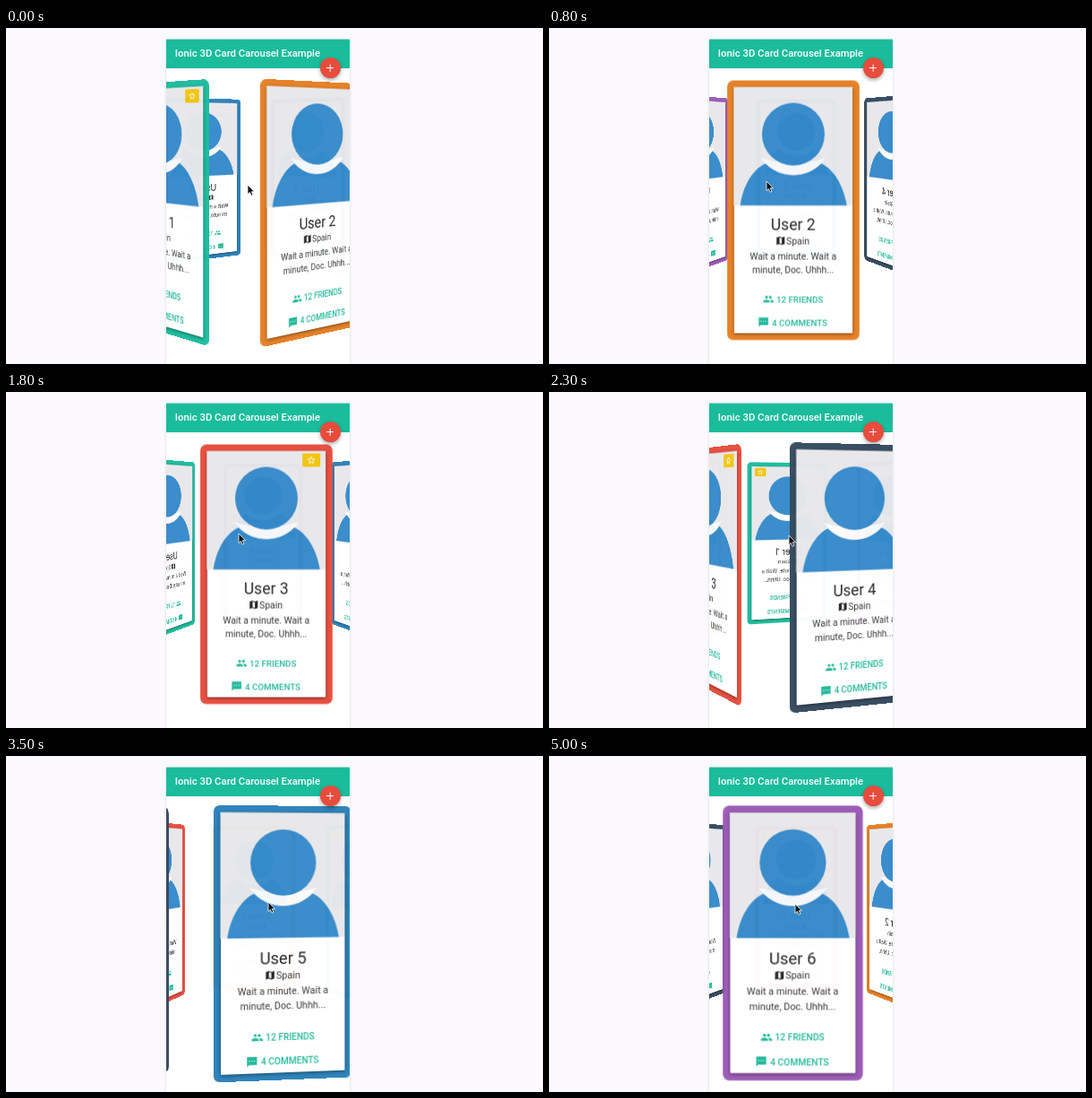
An HTML page that plays this animation: 600x375 px, repeating every 5.1 s.

```html
<!DOCTYPE html>
<html lang="en">
<head>
<meta charset="utf-8">
<title>3D card carousel</title>
<style>
  html, body { margin: 0; width: 100%; height: 100%; overflow: hidden; background: #fbf9fd; }
  body { position: relative; font-family: Roboto, sans-serif; }
  #phone {
    position: absolute; left: 179px; top: 13px; width: 205px; height: 362px;
    background: #fff; box-shadow: 0 0 3px rgba(0, 0, 0, .14);
  }
  #scene {
    position: absolute; inset: 0; overflow: hidden;
    perspective: 560px; perspective-origin: 103px 98.5px;
  }
  .card {
    position: absolute; left: 27.25px; top: 43.7px; width: 151.5px; height: 297.5px;
    border-radius: 7px; opacity: .97;
  }
  .sheet {
    position: absolute; inset: 7.5px; background: #fff; border-radius: 1px;
    box-shadow: 0 1px 4px rgba(0, 0, 0, .5);
  }
  .card svg { position: absolute; left: 0; top: 0; }
  header {
    position: absolute; left: 0; top: 0; width: 100%; height: 32px;
    background: #1abc9c; box-shadow: 0 -1px rgba(26, 188, 156, .4);
    color: #fff; font-size: 11.35px; font-weight: 500; line-height: 31px;
    text-indent: 9.8px; white-space: nowrap; z-index: 2;
  }
  #add {
    position: absolute; left: 171.8px; top: 20px; width: 23px; height: 23px; z-index: 3;
    border-radius: 50%; background: #e74c3c; box-shadow: 0 2px 4px rgba(0, 0, 0, .35);
  }
  #add::before, #add::after {
    content: ""; position: absolute; left: 7.5px; top: 10.8px;
    width: 8px; height: 1.4px; background: #fff;
  }
  #add::after { transform: rotate(90deg); }
  #cursor { position: absolute; left: 0; top: 0; z-index: 4; }
</style>
</head>
<body>
<div id="phone">
  <div id="scene"></div>
  <header>Ionic 3D Card Carousel Example</header>
  <div id="add"></div>
</div>
<svg id="cursor" width="12" height="16" viewBox="-1 -1 12 16">
  <path d="M0 0V10.5L2.4 8.4 4 12.2 5.9 11.4 4.3 7.7H7.5Z" fill="#111" stroke="#fff" stroke-width=".8"/>
</svg>
<script>
const LOOP = 5100, FRAME = 100, TURN = 1000;
const RADIUS = 189.5, WOBBLE = 18.5;
const COLORS = ['#1abc9c', '#e67e22', '#e74c3c', '#34495e', '#2980b9', '#9b59b6'];
const STARRED = [1, 3];
const TURN_STARTS = [-320, 800, 1820, 2850, 3915];

// time, x, y
const POINTER = [
  [0, 270, 175], [350, 296, 172], [650, 292, 172], [800, 243, 171], [950, 220, 166],
  [1500, 283, 159], [1700, 284, 158], [1800, 260, 158], [1950, 222, 159],
  [2500, 294, 160], [2700, 298, 160], [2800, 280, 160], [2950, 228, 161],
  [3500, 293, 163], [3750, 297, 163], [3900, 270, 163], [4200, 235, 163],
  [5000, 275, 165], [5100, 277, 166]
];

const ICONS = {
  map: '<path fill-rule="evenodd" d="M3 5L9 3l6 2 6-2v16l-6 2-6-2-6 2zM9.5 5v12l5 2V7z"/>',
  people: '<circle cx="8" cy="8" r="3"/><circle cx="16" cy="8" r="3"/>' +
    '<path d="M1 19v-2.5C1 14 5.5 13 8 13s7 1 7 3.5V19zM17 19v-2.5c0-1.5-.7-2.5-1.5-3.4C18 13 23 14 23 16.5V19z"/>',
  chat: '<path fill-rule="evenodd" d="M2 2h20v16H6l-4 4zM6 9v2h2V9zM11 9v2h2V9zM16 9v2h2V9z"/>'
};

const icon = (name, x, y, size, color) =>
  `<g transform="translate(${x} ${y}) scale(${size / 24})" fill="${color}">${ICONS[name]}</g>`;

const label = (text, x, y, size, color = '#333', anchor = 'start', weight = 400) =>
  `<text x="${x}" y="${y}" font-size="${size}" fill="${color}" text-anchor="${anchor}" font-weight="${weight}">${text}</text>`;

function starBadge() {
  const points = Array.from({ length: 10 }, (_, i) => {
    const a = i * Math.PI / 5 - Math.PI / 2, r = i % 2 ? 1.9 : 4.2;
    return [127.6 + r * Math.cos(a), 18.2 + r * Math.sin(a)].map(v => v.toFixed(2));
  });
  return `<rect x="117.3" y="10.3" width="20.6" height="15.4" rx="1.5" fill="#f1c40f"/>
    <polygon points="${points.join(' ')}" fill="none" stroke="#fff" stroke-width=".9"/>`;
}

function cardArt(n) {
  const mid = 75.75, teal = '#1fb899', blue = '#3489ca';
  return `<svg width="151.5" height="297.5" font-family="Roboto, sans-serif">
    <rect x="7.5" y="7.5" width="136.5" height="136" fill="#e8e8eb"/>
    <path d="M15 143.5C18 122 29 102 44 95.5A45 45 0 0 0 108 95.5C123 102 134 122 137.5 143.5Z" fill="${blue}"/>
    <path d="M39 89A45 45 0 0 0 113 89Q98 94 76 94T39 89Z" fill="#fafafa"/>
    <circle cx="76" cy="61.7" r="36" fill="${blue}"/>
    ${STARRED.includes(n) ? starBadge() : ''}
    ${label('User ' + n, mid, 172, 18, '#222', 'middle')}
    ${icon('map', 55.2, 177.8, 12.4, '#222')}
    ${label('Spain', 67.9, 187.8, 10.7)}
    ${label('Wait a minute. Wait a', mid, 205.3, 10.6, '#333', 'middle')}
    ${label('minute, Doc. Uhhh...', mid, 221.3, 10.6, '#333', 'middle')}
    ${icon('people', 40.8, 244.5, 13.2, teal)}
    ${label('12 FRIENDS', 56.6, 254.7, 10, teal, 'start', 500)}
    ${icon('chat', 35.2, 271, 13, teal)}
    ${label('4 COMMENTS', 51.4, 281.4, 10, teal, 'start', 500)}
  </svg>`;
}

const scene = document.getElementById('scene');
const cursor = document.getElementById('cursor');
const cards = COLORS.map((color, i) => {
  const card = document.createElement('div');
  card.className = 'card';
  card.style.background = color;
  card.innerHTML = '<div class="sheet"></div>' + cardArt(i + 1);
  scene.append(card);
  return card;
});

// Same curve as the CSS "ease" keyword.
function ease(x) {
  if (x <= 0) return 0;
  if (x >= 1) return 1;
  let lo = 0, hi = 1, s;
  for (let i = 0; i < 24; i++) {
    s = (lo + hi) / 2;
    if (.75 * s * (1 - s) + s ** 3 < x) lo = s; else hi = s;
  }
  return .3 * s * (1 - s) ** 2 + 3 * s * s * (1 - s) + s ** 3;
}

function pointerAt(t) {
  const i = POINTER.findIndex(key => key[0] > t);
  const [t0, x0, y0] = POINTER[i - 1], [t1, x1, y1] = POINTER[i];
  const k = (t - t0) / (t1 - t0);
  return [x0 + (x1 - x0) * k, y0 + (y1 - y0) * k];
}

function draw(t) {
  const front = TURN_STARTS.reduce((sum, start) => sum + ease((t - start) / TURN), 1);
  // The ring's centre circles around the rotation axis.
  const phase = (front - 2.5) * Math.PI / 3;
  const x = WOBBLE * Math.sin(phase);
  const z = -WOBBLE * Math.cos(phase) - RADIUS;
  cards.forEach((card, i) => {
    const angle = 60 * (i + 1 - front);
    card.style.transform =
      `translate3d(${x}px, 0, ${z}px) rotateY(${angle}deg) translateZ(${RADIUS}px)`;
    card.style.zIndex = Math.round(1000 + 1000 * Math.cos(angle * Math.PI / 180));
  });
  const [px, py] = pointerAt(t);
  cursor.style.transform = `translate(${Math.round(px) - 1}px, ${Math.round(py) - 1}px)`;
}

function tick() {
  draw(Math.floor(performance.now() % LOOP / FRAME) * FRAME);
  requestAnimationFrame(tick);
}
tick();
</script>
</body>
</html>
```
